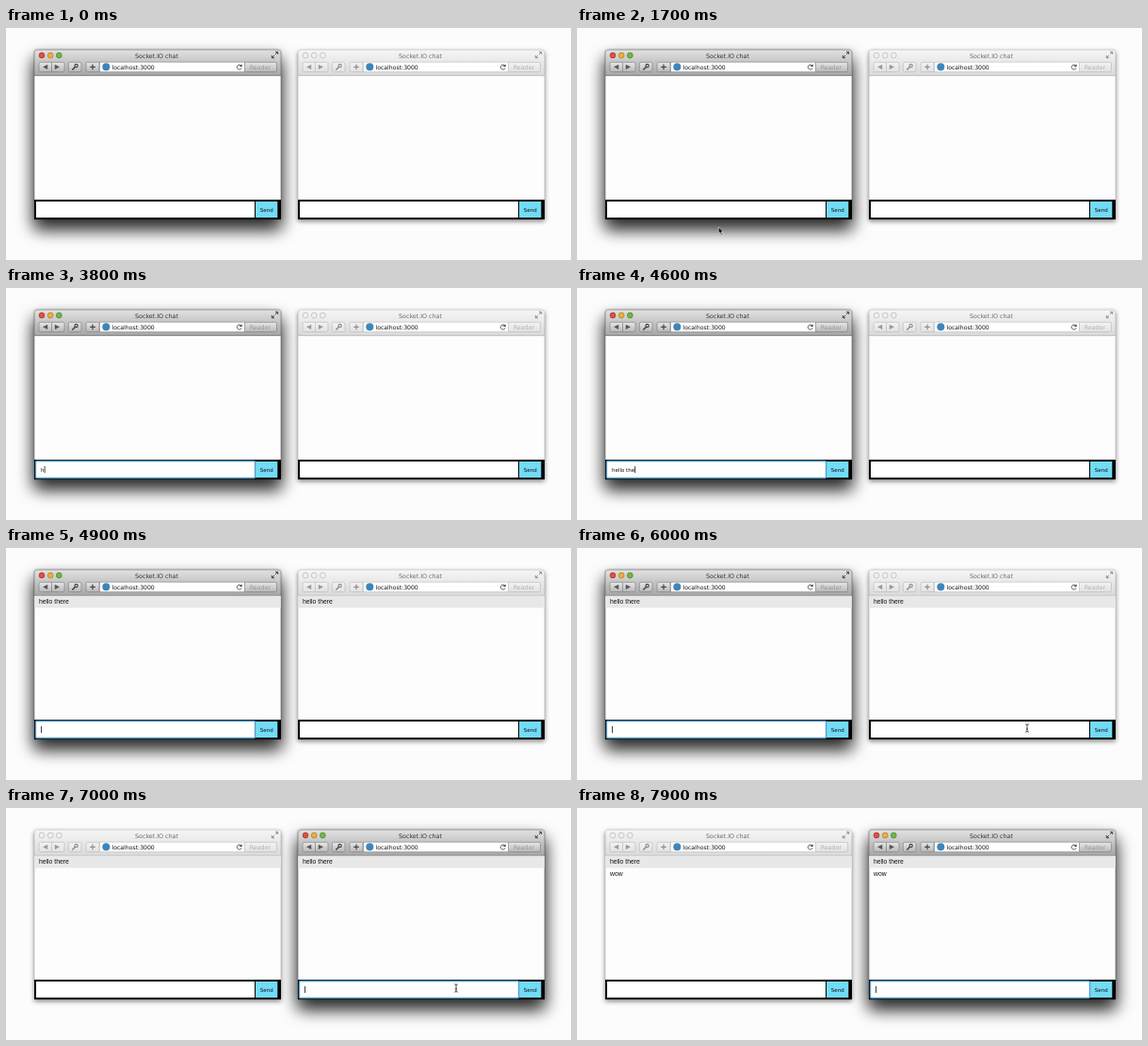
An HTML page that plays this animation: 600x246 px, repeating every 8000 ms.

```html
<!DOCTYPE html>
<html lang="en">
<head>
<meta charset="utf-8">
<title>Chat in two windows</title>
<style>
  html, body { margin: 0; width: 100%; height: 100%; overflow: hidden; background: #fdfcfd; }
  svg { display: block; width: 600px; height: 246px; }
  text { font-family: "DejaVu Sans", sans-serif; fill: #111; white-space: pre; }
  .msg { font: 6.8px "Liberation Sans", Arial, sans-serif; }
  .frame { fill: #fefdfe; filter: drop-shadow(0 2px 2.5px rgba(0,0,0,.5)); }
  .bar { fill: url(#barOff); }
  .edge { stroke: #b4b4b4; }
  .title { fill: #6c6c6c; }
  .btn { fill: url(#btnOff); stroke: #bdbdbd; }
  .field { fill: #fff; stroke: #c2c2c2; }
  .icon { fill: #9a9a9a; }
  .line { fill: none; stroke: #8f8f8f; }
  .light { fill: #f0f0f0; stroke: #b5b5b5; }
  .dim { fill: #b3b3b3; }
  .active .frame { filter: drop-shadow(0 10px 9px rgba(0,0,0,.78)) drop-shadow(0 0 1px rgba(0,0,0,.4)); }
  .active .bar { fill: url(#barOn); }
  .active .edge { stroke: #707070; }
  .active .title { fill: #333; }
  .active .btn { fill: url(#btnOn); stroke: #858585; }
  .active .field { stroke: #8a8a8a; }
  .active .icon { fill: #555; }
  .active .line { stroke: #444; }
  .active .dim { fill: #999; }
  .active .red { fill: #e2503f; stroke: #9c3026; }
  .active .yellow { fill: #eeb03c; stroke: #a87722; }
  .active .green { fill: #72b944; stroke: #477d28; }
</style>
</head>
<body>
<svg viewBox="0 0 600 246">
  <defs>
    <linearGradient id="barOn" x2="0" y2="1">
      <stop offset="0" stop-color="#e2e2e2"/><stop offset="1" stop-color="#a6a6a6"/>
    </linearGradient>
    <linearGradient id="barOff" x2="0" y2="1">
      <stop offset="0" stop-color="#f6f6f6"/><stop offset="1" stop-color="#dadada"/>
    </linearGradient>
    <linearGradient id="btnOn" x2="0" y2="1">
      <stop offset="0" stop-color="#e8e8e8"/><stop offset="1" stop-color="#b8b8b8"/>
    </linearGradient>
    <linearGradient id="btnOff" x2="0" y2="1">
      <stop offset="0" stop-color="#f3f3f3"/><stop offset="1" stop-color="#e2e2e2"/>
    </linearGradient>
  </defs>
  <g id="windows"></g>
  <g id="cursor">
    <circle id="ring" r="4" fill="#ddd" fill-opacity=".6" stroke="#aaa" stroke-width=".7"/>
    <path id="arrow" d="M0 0V7L1.6 5.6L2.8 8.2L4 7.7L2.9 5.1H5Z" fill="#111" stroke="#fff" stroke-width=".5"/>
    <path id="beam" d="M-1.8-4.2Q0-4.2 0-3V3Q0 4.2-1.8 4.2M1.8-4.2Q0-4.2 0-3M0 3Q0 4.2 1.8 4.2M-1 1H1"
      fill="none" stroke="#222" stroke-width=".8"/>
  </g>
</svg>
<script>
const $ = id => document.getElementById(id);
const LOOP = 8000, STEP = 100, GAP = 280;

const button = (x, w) =>
  `<rect class="btn" x="${x}" y="36.3" width="${w}" height="10.2" rx="1.6" stroke-width=".7"/>`;
const light = (x, name) =>
  `<circle class="light ${name}" cx="${x}" cy="29" r="2.9" stroke-width=".7"/>`;
const message = (y, s) => `<text class="msg" x="35" y="${y}">${s}</text>`;

const windowMarkup = (id, x) => `
<g id="${id}" transform="translate(${x})">
  <path class="frame" d="M30 203V26Q30 23 33 23H289Q292 23 292 26V203Z"/>
  <path class="bar" d="M30 50.5V26Q30 23 33 23H289Q292 23 292 26V50.5Z"/>
  <path class="edge" d="M30 50.3H292" stroke-width=".8"/>
  <path class="edge" d="M30.2 182V26Q30.2 23.2 33 23.2H289Q291.8 23.2 291.8 26V182" fill="none" stroke-width=".5"/>
  ${light(38, "red")}${light(47.2, "yellow")}${light(56.3, "green")}
  <text class="title" x="160" y="31.5" font-size="6.35" text-anchor="middle">Socket.IO chat</text>
  <path class="line" d="M282.5 31.5L285 29M286 28L288.5 25.5M282.3 29V31.7H285M286 25.3H288.7V28" stroke-width="1"/>
  ${button(35, 27)}${button(66.3, 13.7)}${button(85, 14)}
  <path class="edge" d="M48.5 36.5V46.3" stroke-width=".6"/>
  <path class="icon" d="M39 41.3L44.2 38.7V43.9ZM57 41.3L51.8 38.7V43.9Z"/>
  <path class="line" d="M70.3 44.5L73.5 41.2" stroke-width="1.6"/>
  <circle class="line" cx="74.6" cy="40" r="1.6" stroke-width="1.2"/>
  <path class="line" d="M92 38.6V44.2M89.2 41.4H94.8" stroke-width="1.2"/>
  ${button(253, 34.5)}
  <rect class="field" x="99.5" y="36.1" width="154" height="10.6" stroke-width=".7"/>
  <circle cx="106.3" cy="41.3" r="4" fill="#3d86bb"/>
  <text x="112.5" y="43.7" font-size="6.15">localhost:3000</text>
  <path d="M249.9 40.2A2.5 2.5 0 1 0 250.1 42.4" fill="none" stroke="#444" stroke-width=".9"/>
  <path d="M250.6 38.2V41H247.8Z" fill="#444"/>
  <text class="dim" x="258.7" y="43.7" font-size="6.35">Reader</text>
  <g data-part="first"><rect x="30.4" y="50.7" width="261.2" height="12.8" fill="#e9e8e9"/>${message(59.4, "hello there")}</g>
  <g data-part="second">${message(72.4, "wow")}</g>
  <rect x="30" y="182" width="262" height="21" fill="#000"/>
  <rect x="32" y="184" width="232" height="17" fill="#fff"/>
  <rect x="265" y="184" width="23.3" height="17" fill="#72dbf5"/>
  <text x="276.8" y="194.8" font-size="5.5" text-anchor="middle">Send</text>
  <rect data-part="focus" x="31.5" y="183.5" width="233" height="18" rx="1" fill="none" stroke="#559dca" stroke-width="1.3"/>
  <text data-part="draft" x="37" y="194.8" font-size="5.5"></text>
  <rect data-part="caret" y="189" width=".8" height="7" fill="#111"/>
</g>`;

$("windows").innerHTML = windowMarkup("right", GAP) + windowMarkup("left", 0);

const within = (t, ranges) => ranges.some(([a, b]) => t >= a && t < b);
const show = (el, on) => el.setAttribute("visibility", on ? "visible" : "hidden");

// Each entry: time, number of letters typed so far
const chats = {
  left: {
    text: "hello there",
    keys: [[3800, 1], [4000, 3], [4200, 4], [4300, 5], [4400, 6], [4500, 8], [4600, 9], [4700, 11], [4800, 0]],
    focus: [[2900, 6200]],
    caret: [[2900, 3500], [3800, 5400], [5900, 6200]],
    active: [[0, 6200]]
  },
  right: {
    text: "wow",
    keys: [[7300, 1], [7400, 2], [7600, 3], [7900, 0]],
    focus: [[6700, LOOP]],
    caret: [[6700, 7200], [7300, LOOP]],
    active: [[6200, LOOP]]
  }
};

// Pointer waypoints: time, x, y
const strokes = [
  { until: 3800, path: [[1500, 270, 231], [1600, 205, 222], [1700, 150.3, 211], [1900, 146, 205], [2200, 142.5, 195]] },
  { until: 7300, path: [[5400, 142.5, 195], [5600, 245, 198], [5700, 318, 198], [5900, 455, 193], [6000, 478, 191]] }
];
const clicks = [[2800, 3000], [6200, 6400], [6600, 6800]];

function pointAt(path, t) {
  const i = path.findIndex(p => p[0] > t);
  if (i < 0) return path[path.length - 1].slice(1);
  const [a, b] = [path[i - 1], path[i]];
  const k = (t - a[0]) / (b[0] - a[0]);
  return [1, 2].map(n => a[n] + (b[n] - a[n]) * k);
}

function drawWindow(id, t) {
  const chat = chats[id], root = $(id);
  const part = name => root.querySelector(`[data-part=${name}]`);
  const typed = chat.keys.reduce((n, [at, count]) => t >= at ? count : n, 0);
  const draft = part("draft"), caret = part("caret");
  root.setAttribute("class", within(t, chat.active) ? "active" : "");
  show(part("first"), t >= 4800);
  show(part("second"), t >= 7900);
  show(part("focus"), within(t, chat.focus));
  show(caret, within(t, chat.caret));
  draft.textContent = chat.text.slice(0, typed);
  caret.setAttribute("x", 37.2 + (typed ? draft.getComputedTextLength() : 0));
}

function drawCursor(t) {
  const stroke = strokes.find(s => t >= s.path[0][0] && t < s.until);
  show($("cursor"), stroke);
  if (!stroke) return ["ring", "arrow", "beam"].forEach(id => show($(id), false));
  const [x, y] = pointAt(stroke.path, t);
  const overInput = y > 184 && y < 201 && within(x, [[32, 264], [312, 544]]);
  const beam = overInput && !within(t, [[6200, 6500]]);
  $("cursor").setAttribute("transform", `translate(${x} ${y})`);
  show($("beam"), beam);
  show($("arrow"), !beam);
  show($("ring"), within(t, clicks));
}

function frame() {
  const t = Math.floor(performance.now() % LOOP / STEP) * STEP;
  drawWindow("left", t);
  drawWindow("right", t);
  drawCursor(t);
  requestAnimationFrame(frame);
}
frame();
</script>
</body>
</html>
```
